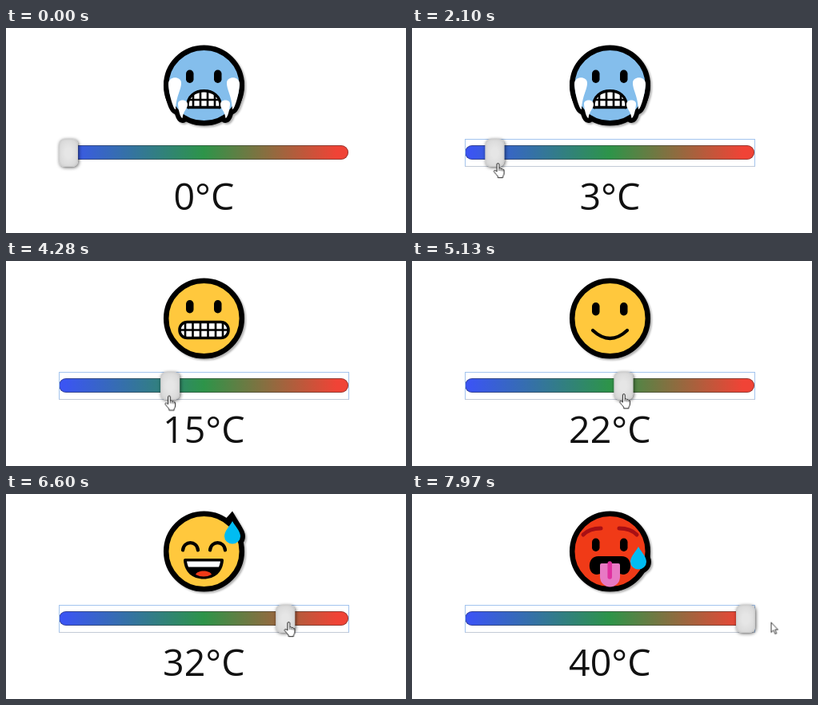
An HTML page without scripts that plays this animation: 500x257 px, repeating every 8000 ms.

```html
<!DOCTYPE html>
<html lang="en">
<head>
<meta charset="utf-8">
<title>Temperature slider</title>
<style>
@property --v { syntax: "<integer>"; inherits: true; initial-value: 0; }

html, body { margin: 0; width: 100%; height: 100%; overflow: hidden; background: #fff; }
.stage {
  position: relative; width: 500px; height: 257px; overflow: hidden;
  animation: value 8s linear infinite;
}
.stage > * { position: absolute; }
svg { left: 0; top: 0; width: 500px; height: 257px; }

/* The temperature drives the thumb, the label and the faces. */
@keyframes value {
  0%, 20.625% { --v: 0; }
  26.25% { --v: 3; }
  30.5% { --v: 6; }
  37.6% { --v: 9; }
  40.6% { --v: 10; }
  50.75% { --v: 14; }
  53.6% { --v: 15; }
  61.25% { --v: 21; }
  71.25% { --v: 25; }
  74.9% { --v: 27; }
  82% { --v: 32; }
  89.4% { --v: 36; }
  93.4%, 100% { --v: 40; }
}

.track {
  left: 66px; top: 147px; width: 362px; height: 18px; box-sizing: border-box;
  border-radius: 9px;
  background: linear-gradient(90deg, #3b55f2 2%, #2d9449 50%, #f04336 96%);
  box-shadow: inset 0 0 0 1px rgba(40, 40, 40, .45);
}
.focus {
  left: 65.5px; top: 139px; width: 363px; height: 35px; box-sizing: border-box;
  border: 1px solid #a3c4ee; border-bottom-color: #c3cad6;
  animation: focus 8s step-end infinite;
}
@keyframes focus { 0% { opacity: 0; } 16.87%, 100% { opacity: 1; } }

.thumb {
  left: 66px; top: 139px; width: 24px; height: 35px; border-radius: 7px;
  background: radial-gradient(ellipse at 50% 50%, #e6e6e6 25%, #d2d2d2 100%);
  box-shadow: inset 0 0 3px #bbb, 1px 1px 4px rgba(0, 0, 0, .65);
  transform: translateX(calc(var(--v) * 8.475px));
}
.label {
  left: 0; top: 178px; width: 494.6px; text-align: center; color: #111;
  font: 46.5px/64px "Open Sans", "Noto Sans", sans-serif;
  counter-reset: temp var(--v);
}
.label::before { content: counter(temp); }

.face {
  opacity: calc(min(var(--v) - var(--lo), var(--hi) - var(--v)) + 1);
  filter: drop-shadow(2px 2px 1px rgba(0, 0, 0, .3));
}
.skin { stroke: #000; stroke-width: 6.5; }
.line { fill: none; stroke: #000; stroke-width: 4.2; stroke-linecap: round; }
.grid { fill: none; stroke: #000; stroke-width: 2.6; }
.rim { stroke: #000; stroke-width: 12; stroke-linejoin: round; }

.cursor { animation: move 8s linear infinite; }
.cursor path { fill: #fff; stroke: #222; stroke-linejoin: round; }
.arrow { animation: arrow 8s step-end infinite; }
.hand { animation: hand 8s step-end infinite; }
@keyframes arrow { 0% { opacity: 1; } 14.12% { opacity: 0; } 94.3%, 100% { opacity: 1; } }
@keyframes hand { 0% { opacity: 0; } 14.12% { opacity: 1; } 94.3%, 100% { opacity: 0; } }
@keyframes move {
  0%, 2.2% { transform: translate(212px, 262px); animation-timing-function: ease-in-out; }
  12.25%, 14.1% { transform: translate(73px, 165px); }
  14.13%, 20.6% { transform: translate(73px, 164.5px); }
  26.25% { transform: translate(101.5px, 169px); }
  30.5% { transform: translate(122px, 169px); }
  37.6% { transform: translate(147.5px, 168.5px); }
  50.75% { transform: translate(189px, 168px); }
  53.5% { transform: translate(198px, 168.5px); }
  61.25% { transform: translate(249px, 167px); }
  71.25% { transform: translate(283px, 164px); }
  74.9% { transform: translate(300px, 162px); }
  82% { transform: translate(345px, 160px); }
  89.6% { transform: translate(380.5px, 159.5px); }
  92.5% { transform: translate(411px, 160px); }
  96.1%, 97.6% { transform: translate(434.5px, 160px); }
  99.6%, 100% { transform: translate(448.5px, 160.5px); }
}
</style>
</head>
<body>
<div class="stage">
  <svg viewBox="0 0 500 257">
    <defs>
      <circle id="head" class="skin" cx="247.5" cy="72" r="47.3"/>
      <g id="eyes">
        <rect x="225" y="0" width="9.5" height="16.5" rx="4.75"/>
        <rect x="260" y="0" width="9.5" height="16.5" rx="4.75"/>
      </g>
      <g id="ice">
        <path d="M203 70C203 60 219 60 219 69C219 78 213 84 212 102C209 102 203 80 203 70Z"/>
        <path d="M215 95C215 89 227 89 227 96C227 101 222 103 220.5 113C218 113 215 101 215 95Z"/>
      </g>
      <path id="drop" d="M283 34C286 40 293 46 293 53A10 9.5 0 0 1 273 53C273 46 280 40 283 34Z"/>
    </defs>

    <!-- freezing -->
    <g class="face" style="--lo: 0; --hi: 8">
      <g class="rim">
        <use href="#ice"/>
        <use href="#ice" transform="matrix(-1 0 0 1 495 0)"/>
      </g>
      <use href="#head" fill="#84beec"/>
      <use href="#eyes" y="52.5"/>
      <g fill="#fff">
        <path d="M227 99C225 72 270 72 268 99Q267 100 266 99.500H229Q228 100 227 99Z" stroke="#000" stroke-width="3.4"/>
        <path class="grid" d="M234 82V99M243 79V99M252 79V99M261 82V99M228 90H267"/>
        <use href="#ice"/>
        <use href="#ice" transform="matrix(-1 0 0 1 495 0)"/>
      </g>
    </g>

    <!-- chilly -->
    <g class="face" style="--lo: 9; --hi: 16">
      <use href="#head" fill="#ffc83d"/>
      <use href="#eyes" y="49"/>
      <rect x="217" y="76.500" width="61" height="20" rx="9.500" fill="#fff" stroke="#000" stroke-width="3.500"/>
      <path class="grid" d="M224 78V95M233.500 77V96M243 77V96M252.500 77V96M262 77V96M271 78V95M217 86.500H278"/>
    </g>

    <!-- pleasant -->
    <g class="face" style="--lo: 17; --hi: 24">
      <use href="#head" fill="#ffc83d"/>
      <use href="#eyes" y="52"/>
      <path class="line" d="M226 87Q247.500 107 269 87"/>
    </g>

    <!-- warm -->
    <g class="face" style="--lo: 25; --hi: 32">
      <use href="#drop" class="rim"/>
      <path d="M272 34L283 21.500L294 40Z"/>
      <use href="#head" fill="#ffc83d"/>
      <path class="line" d="M221 70.500C222 58 239 58 240 70.500M255 70.500C256 58 273 58 274 70.500"/>
      <path d="M222 83Q222 81 224 81H270Q272 81 272 83C271 98 261 106.500 247 106.500S223 98 222 83Z"/>
      <path d="M226 84.500H268Q267.500 88 266 91.500H228Q226.500 88 226 84.500Z" fill="#fff"/>
      <path d="M237 101C239 95 255 95 257 101Q247 106 237 101Z" fill="#f03a17"/>
      <use href="#drop" fill="#00bcf2"/>
    </g>

    <!-- hot -->
    <g class="face" style="--lo: 33; --hi: 40">
      <use href="#drop" class="rim" y="32"/>
      <use href="#head" fill="#f03a17"/>
      <use href="#eyes" y="55.500"/>
      <path class="line" style="stroke: #a80f14; stroke-width: 5" d="M214 51Q222 43 236 43M259 43Q273 43 281 51"/>
      <path d="M233 78H262C277 78 276 101 264 101Q247.500 96 231 101C219 101 218 78 233 78Z"/>
      <path d="M235 89Q235 87 237 87H258Q260 87 260 89V104A12.500 12.500 0 0 1 235 104Z" fill="#e879c4"/>
      <path d="M247.200 87V104" class="line" style="stroke: #e0309f; stroke-width: 5.500"/>
      <use href="#drop" y="32" fill="#00bcf2"/>
    </g>
  </svg>

  <div class="track"></div>
  <div class="focus"></div>
  <div class="thumb"></div>
  <div class="label">°C</div>

  <svg viewBox="0 0 500 257">
    <g class="cursor">
      <path class="arrow" stroke-width=".9" d="M.5 .5V13L3.400 10.300L5.400 15L7.300 14.200L5.300 9.600H9Z"/>
      <g class="hand">
        <path d="M4.500 11V2A1.400 1.400 0 0 1 7.300 2V7Q8.700 6 9.700 7.500Q11.200 6.800 11.900 8.300Q13.600 8 13.600 10V13Q13.400 15.500 12 17V18.700H5.800V17Q3.500 14.500 1 11.200C.4 9.500 2 9 3.200 10Z"/>
        <path d="M7.300 7V10M9.700 7.500V10.300M11.900 8.300V10.600" stroke-width=".8"/>
      </g>
    </g>
  </svg>
</div>
</body>
</html>
```
